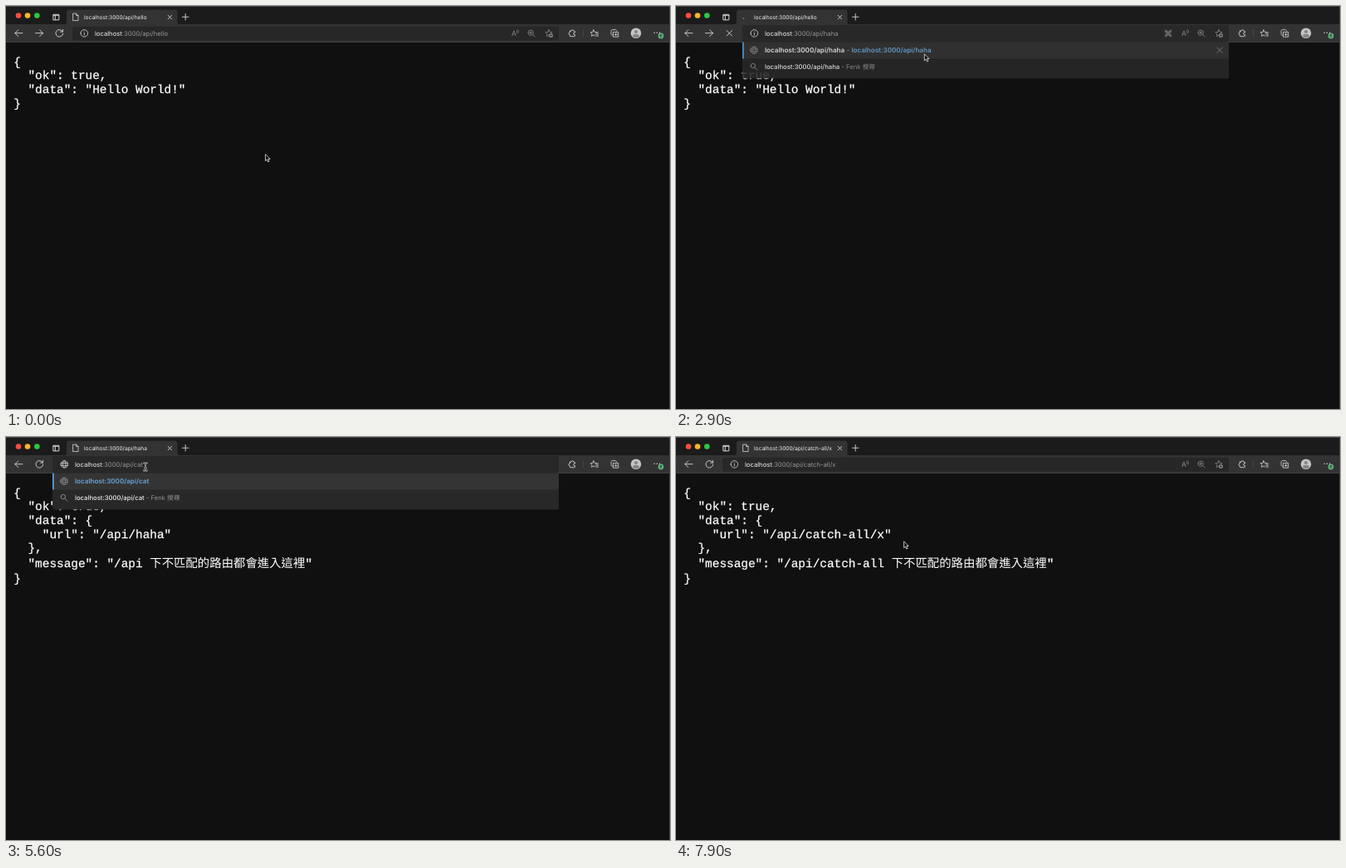
Write an HTML page that moves like this. It is 800x486 px and loops after 8000 ms.

```html
<!DOCTYPE html>
<html lang="zh-Hant">
<head>
<meta charset="utf-8">
<title>API routes</title>
<style>
html, body { margin: 0; width: 100%; height: 100%; overflow: hidden; background: #101010; }
svg { display: block; width: 800px; height: 486px; }
text { font-family: Inter, "Noto Sans CJK TC", "Noto Sans CJK", sans-serif; text-rendering: geometricPrecision; white-space: pre; }
.mono { font: 14.4px "Liberation Mono", "Noto Sans CJK TC", "Noto Sans CJK", monospace; fill: #fff; stroke: #fff; stroke-width: .25; }
.han { stroke: none; }
.url { font-size: 7.7px; }
.bold { font-size: 8.05px; font-weight: 600; }
.ico { fill: none; stroke-linecap: round; stroke-linejoin: round; }
</style>
</head>
<body>
<svg id="stage" viewBox="0 0 800 486"></svg>
<script>
const LOOP = 8000, STEP = 100;
const HOST = 'localhost', BASE = ':3000/api/';
const stage = document.getElementById('stage');
const pen = document.createElement('canvas').getContext('2d');

const rect = (x, y, w, h, fill, extra = '') =>
  `<rect x="${x}" y="${y}" width="${w}" height="${h}" fill="${fill}" ${extra}/>`;
const circle = (x, y, r, fill) => `<circle cx="${x}" cy="${y}" r="${r}" fill="${fill}"/>`;
const icon = (x, y, d, color = '#d6d6d6', w = .9) =>
  `<path class="ico" transform="translate(${x} ${y})" d="${d}" stroke="${color}" stroke-width="${w}"/>`;
const text = (x, y, s, fill, extra = 'class="url"') =>
  `<text x="${x}" y="${y}" fill="${fill}" ${extra}>${s}</text>`;
const span = (s, fill, weight = 400) =>
  `<tspan fill="${fill}" font-weight="${weight}">${s}</tspan>`;
const ring = r => `M${-r} 0a${r} ${r} 0 1 1 ${2 * r} 0a${r} ${r} 0 1 1 ${-2 * r} 0z`;

function star(r) {
  let d = '';
  for (let i = 0; i < 10; i++) {
    const a = i * Math.PI / 5, k = i % 2 ? r * .48 : r;
    d += (i ? 'L' : 'M') + (k * Math.sin(a)).toFixed(2) + ' ' + (-k * Math.cos(a)).toFixed(2);
  }
  return d + 'z';
}

const D = {
  back: 'M4.5 0H-4.5M-.6 -3.9L-4.5 0L-.6 3.9',
  forward: 'M-4.5 0H4.5M.6 -3.9L4.5 0L.6 3.9',
  reload: 'M3.9 -1.8A4.3 4.3 0 1 0 4.3 .4M4.1 -4.4V-1.7H1.4',
  cross: 'M-3.2 -3.2L3.2 3.2M3.2 -3.2L-3.2 3.2',
  smallCross: 'M-2.2 -2.2L2.2 2.2M2.2 -2.2L-2.2 2.2',
  plus: 'M-3.8 0H3.8M0 -3.8V3.8',
  page: 'M-3 -4.2H.6L3 -1.8V4.2H-3zM.6 -4.2V-1.8H3',
  info: ring(4.3) + 'M0 -.4V2.2M0 -2.1V-2',
  globe: ring(4.2) + 'M-4 -1.4H4M-4 1.4H4M0 -4.2C-2.4 -2 -2.4 2 0 4.2C2.4 2 2.4 -2 0 -4.2',
  search: 'M-3.9 -1.2a2.7 2.7 0 1 1 5.4 0a2.7 2.7 0 1 1 -5.4 0M.8 .8L4 4',
  zoom: 'M-4 -.8a3.2 3.2 0 1 1 6.4 0a3.2 3.2 0 1 1 -6.4 0M1.6 1.5L4.2 4.1M-2.3 -.8H.7M-.8 -2.3V.7',
  device: 'M-3.2 1.8V-2.6H3.6V-1.6M-4.2 2.3H.4M1.4 -1.2H4.2V2.6H1.4z',
  grid: 'M-4 -2H4M-4 2H4M-2 -4V4M2 -4V4M-4 -4L-2 -2M4 -4L2 -2M-4 4L-2 2M4 4L2 2M-.8 -.8H.8V.8H-.8z',
  puzzle: 'M-2.4 -2.9H-.8A1.3 1.3 0 0 1 1.8 -2.9H2.6Q3.5 -2.9 3.5 -2V-1H3A1.3 1.3 0 0 0 3 1.6H3.5V2.8Q3.5 3.7 2.6 3.7H-1.8Q-2.7 3.7 -2.7 2.8V1.6A1.3 1.3 0 0 1 -2.7 -1V-2Q-2.7 -2.9 -2.4 -2.9z',
  stack: 'M-1.6 -1.6H4.2V4.2H-1.6zM1.3 -.2V2.8M-.2 1.3H2.8M-3 2.2C-4.2 2 -4.4 1.4 -4.4 .6V-2.6C-4.4 -3.7 -3.7 -4.4 -2.6 -4.4H.6C1.5 -4.4 2 -4 2.2 -3',
  beam: 'M-1.8 -4.5Q0 -4.5 0 -3.2Q0 -4.5 1.8 -4.5M0 -3.2V3.2M-1.8 4.5Q0 4.5 0 3.2Q0 4.5 1.8 4.5M-1 1.3H1'
};

// Pointer path: time, x, y
const PATH = [
  [1000, 312.3, 178.5], [1700, 190, 33], [2000, 190, 33], [2300, 299, 57.5],
  [2900, 299, 57.5], [3300, 302, 135], [4300, 302, 135], [5100, 168, 36],
  [6100, 168, 36], [6400, 270.5, 121], [6600, 270.5, 121], [6900, 274.3, 125.5]
];

function pointerAt(t) {
  let a = PATH[0];
  for (const b of PATH) {
    if (t <= b[0]) {
      const u = b === a ? 0 : (t - a[0]) / (b[0] - a[0]);
      const e = u * u * (3 - 2 * u);
      return [a[1] + (b[1] - a[1]) * e, a[2] + (b[2] - a[2]) * e];
    }
    a = b;
  }
  return [a[1], a[2]];
}

function stateAt(t) {
  const page = t < 3100 ? 'hello' : t < 7200 ? 'haha' : 'catch-all/x';
  const s = { page, path: page, wide: t < 3100, select: '', focus: false,
    rows: 0, fade: 1, loading: false, tools: 3, typing: false };

  if (t >= 1700 && t < 2500) {
    s.focus = true;
    s.tools = 5;
    s.select = t < 2000 ? 'all' : 'path';
  } else if (t >= 2500 && t < 3100) {
    s.path = 'haha'.slice(0, Math.floor((t - 2400) / 100));
    s.typing = t < 2900;
    s.rows = t < 2700 ? 4 : t < 3000 ? 2 : 0;
    s.tools = s.typing ? 0 : 4;
    s.loading = !s.typing;
    s.fade = s.typing ? 1 : .9;
  } else if (t >= 5200 && t < 5500) {
    s.focus = true;
    s.tools = 5;
    s.select = t < 5300 ? 'all' : 'path';
  } else if (t >= 5500 && t < 7200) {
    s.path = 'catch-all/x'.slice(0, Math.ceil((t - 5400) / 800 * 11));
    s.typing = t < 7000;
    s.rows = s.typing ? 2 : 0;
    s.tools = s.typing ? 0 : 4;
    s.loading = !s.typing;
  }
  return s;
}

function content(page) {
  const route = page === 'haha' ? '/api' : '/api/catch-all';
  const lines = page === 'hello'
    ? [[0, '{'], [2, '"ok": true,'], [2, '"data": "Hello World!"'], [0, '}']]
    : [[0, '{'], [2, '"ok": true,'], [2, '"data": {'], [4, `"url": "/api/${page}"`], [2, '},'],
       [2, `"message": "${route} <tspan class="han">下不匹配的路由都會進入這裡</tspan>"`], [0, '}']];
  return lines.map(([n, s], i) =>
    text(9.2 + n * 8.64, 71.6 + i * 16.7 + Math.max(0, i - 4) * 1.6, s, '#fff', 'class="mono"')).join('');
}

function chrome() {
  const gray = '#d6d6d6';
  return rect(0, 0, 800, 486, '#101010') + rect(0, 0, 800, 23, '#1b1b1b') + rect(0, 0, 800, 1, '#444') +
    '<path d="M70 22.5Q73 22.5 73 19.5V7.5Q73 4.5 76 4.5H203.5Q206.5 4.5 206.5 7.5V19.5Q206.5 22.5 209.5 22.5z" fill="#333"/>' +
    rect(0, 22, 800, 21, '#333') + rect(0, 43, 800, 1, '#3f3f3f') + rect(799, 1, 1, 485, '#3a3a3a') +
    circle(15, 11.5, 3.3, '#ff4b40') + circle(26, 11.5, 3.3, '#f8b62b') + circle(37.3, 11.5, 3.3, '#2bc840') +
    icon(60.5, 13.5, 'M-3.3 -3.2H3.3V3.3H-3.3zM-3.3 -2.3H3.3M-1.2 -2.3V3.3', gray, 1) +
    icon(197.4, 13.5, D.smallCross, gray) + icon(216.2, 13.2, D.plus, gray) +
    icon(15.4, 32.7, D.back, gray) +
    icon(682, 33, D.puzzle, gray) + rect(695.3, 28.5, .8, 9, '#4c4c4c') +
    icon(708, 33, star(4.2), gray, .8) + rect(709.6, 31.8, 4, 4.5, '#333') +
    icon(711.5, 33, 'M-1 -1H2M-.8 1H2M0 3H2', gray) +
    icon(733.5, 33, D.stack, gray, .85) +
    circle(759, 32.8, 6.3, '#c4c4c4') + circle(759, 31, 2.1, '#858585') +
    '<path d="M755 36.8a4 3 0 0 1 8 0a6 6 0 0 1 -8 0z" fill="#858585"/>' +
    [781.2, 784.4, 787.6].map(x => circle(x, 32.3, .75, gray)).join('') +
    circle(789, 36, 3.4, '#5fae7c') + icon(789, 36, 'M0 1.6V-1.5M-1.2 -.4L0 -1.6L1.2 -.4', '#173a25', .8);
}

function tools(n) {
  const c = '#8a8a8a';
  const list = [
    icon(654, 33, star(4.4), c, .8) + circle(656.4, 35.5, 2.5, c) +
      icon(656.4, 35.5, 'M-1.2 0H1.2M0 -1.2V1.2', '#272727', .7),
    icon(633, 33, D.zoom, c, .8),
    text(609, 36.2, 'A', c, 'font-size="8.5"') +
      icon(616.3, 31.2, 'M-1 -1.8Q.2 -.4 -1 1M.5 -2.6Q2.3 -.4 .5 1.8', c, .7),
    icon(593, 33, D.grid, c, .8),
    icon(573, 33, D.device, c, .8)
  ];
  return list.slice(0, n).join('');
}

function panel(s, ax) {
  const blue = '#6aa6d6', white = '#ececec', dim = '#909090', bold = 'class="bold"';
  const tx = ax + 27, url = HOST + BASE + s.path, w = 666 - ax;
  let out = rect(ax, 43, w, 4.5 + s.rows * 20, '#282828', 'rx="1.5"') +
    rect(ax, 43.5, w, 20, '#343434') + rect(ax, 43.5, 1.7, 20, '#5aa3e0') +
    icon(ax + 14, 53.3, D.globe, dim, .8);
  if (s.wide) {
    const first = HOST + BASE + (s.rows > 2 ? 'hello' : 'haha');
    out += text(tx, 56, first + span(' - ', dim) + span(first, blue, 600), white, bold) +
      icon(655, 53.3, D.cross, '#929292', .8);
    for (let i = 1; i < s.rows - 1; i++) {
      out += icon(ax + 14, 53.3 + i * 20, D.globe, dim, .8) +
        text(tx, 56 + i * 20, HOST + BASE + (i === 1 ? 'haha' : ''), white, bold);
    }
  } else {
    out += text(tx, 56, url, blue, bold);
  }
  const y = 53.3 + (s.rows - 1) * 20;
  out += icon(ax + 14, y, D.search, dim) +
    text(tx, y + 2.7, span(url, white, 500) + span(' - Fenk 搜尋', dim), dim);
  return `<g opacity="${s.fade}">${out}</g>`;
}

function address(s) {
  const ax = s.wide ? 80 : 56, tx = ax + 27, all = s.select === 'all';
  let out = s.wide ? icon(40, 32.7, D.forward) : '';
  out += icon(ax - 15.7, 32.8, s.loading ? D.cross : D.reload);
  if (s.rows) {
    out += panel(s, ax) + rect(ax, 23, 666 - ax, 20.5, '#282828', 'rx="2"');
  } else {
    out += rect(ax, 24.8, 666 - ax, 16.6, '#272727',
      'rx="2.5"' + (s.focus ? ' stroke="#4f9fe6" stroke-width="1.4"' : ''));
  }
  out += icon(ax + 14.3, 32.9, s.typing ? D.globe : D.info, '#d0d0d0', .85);
  if (s.select) {
    pen.font = '7.7px Inter, sans-serif';
    const from = all ? 0 : pen.measureText(HOST + BASE).width;
    const to = pen.measureText(HOST + BASE + s.path).width;
    out += rect(tx + from, 28, to - from, 10, '#2f65a6');
  }
  out += text(tx, 35.6, HOST + span(BASE, all ? '#fff' : '#969696') +
    span(s.path, s.select ? '#fff' : '#969696'), '#f0f0f0');
  return out + tools(s.tools);
}

function pointer(t) {
  const [x, y] = pointerAt(t);
  if (y < 42) return icon(x, y, D.beam, '#ddd', 1.8) + icon(x, y, D.beam, '#111', .7);
  return `<path transform="translate(${x} ${y})" d="M.3 .3V8.3L2.1 6.6L3.4 9.5L4.8 8.9L3.5 6H5.9z" ` +
    'fill="#080808" stroke="#e8e8e8" stroke-width=".8" stroke-linejoin="round"/>';
}

function tab(s, t) {
  const mark = s.loading
    ? `<g transform="rotate(${(t - 2900) * .9} 84 13.3)">` +
      icon(84, 13.3, 'M-3 1.2A3.2 3.2 0 0 0 -2.2 2.3', '#aaa') + '</g>'
    : icon(84, 13.3, D.page, '#d6d6d6', .8);
  return mark + text(94, 15.7, HOST + BASE + s.page, '#f0f0f0', 'font-size="6.6"');
}

stage.innerHTML = chrome() + '<g id="live"></g>';
const live = document.getElementById('live');
const start = performance.now();
let shown = -1;

function draw() {
  const t = Math.floor((performance.now() - start) % LOOP / STEP) * STEP;
  if (t !== shown) {
    shown = t;
    const s = stateAt(t);
    live.innerHTML = tab(s, t) + content(s.page) + address(s) + pointer(t);
  }
  requestAnimationFrame(draw);
}
draw();
</script>
</body>
</html>
```
